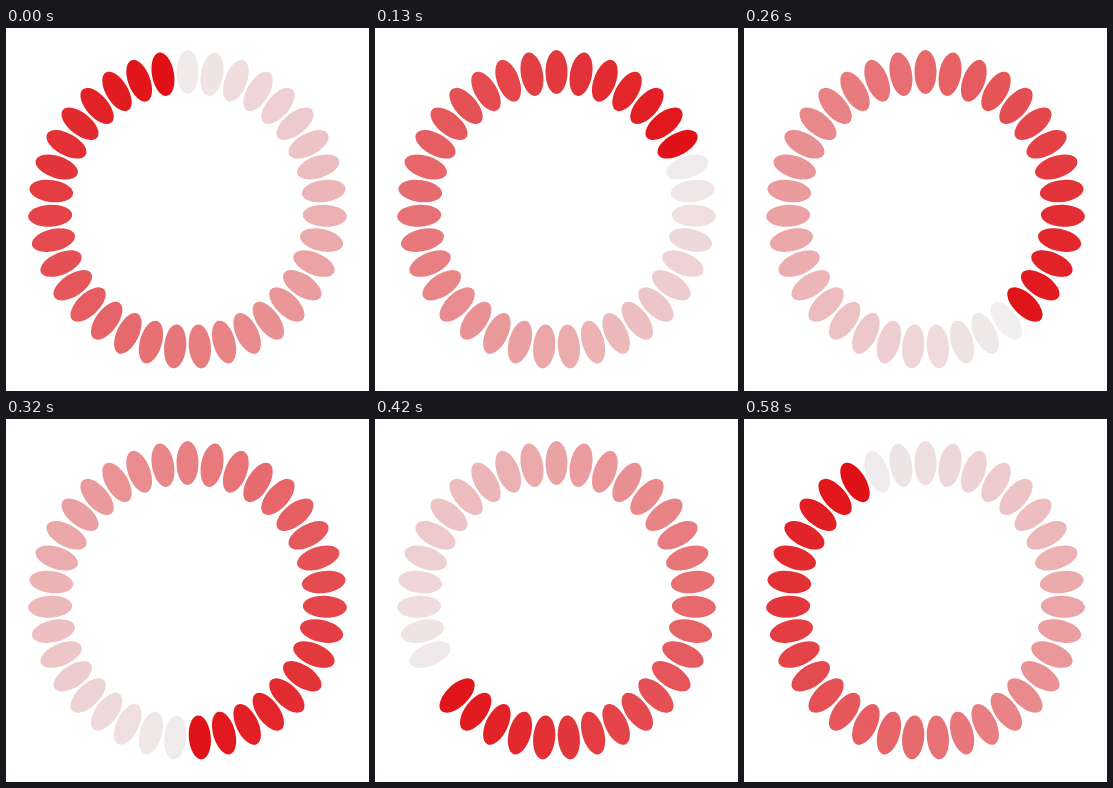
Write an HTML page with a canvas that moves like this. It is 363 px wide and 363 px high and loops after 620 ms.

```html
<!DOCTYPE html>
<html lang="en">
<head>
<meta charset="utf-8">
<title>Loading ring</title>
<style>
  html, body { margin: 0; width: 100%; height: 100%; overflow: hidden; background: #fff; }
  canvas { display: block; }
</style>
</head>
<body>
<canvas id="stage" width="363" height="363"></canvas>
<script>
const ctx = document.getElementById('stage').getContext('2d');
const SIZE = 363, LOOP = 620, STEPS = 19, PETALS = 35, RING = 137.5;
const PALE = [240, 240, 241], RED = [224, 16, 21];

// Steps last 32.4 ms, with their starts rounded to 10 ms.
function stepAt(ms) {
  const tick = Math.floor((ms % LOOP) / 10) * 10;
  return Math.floor((tick + 5) / 32.4);
}

function petalColor(age) {
  if (age < 0.1) return '#fff'; // blank for an instant before turning red
  const mix = PALE.map((c, k) => Math.round(c + (RED[k] - c) * age / PETALS));
  return `rgb(${mix})`;
}

function draw(ms) {
  const shift = stepAt(ms) * PETALS / STEPS;
  ctx.fillStyle = '#fff';
  ctx.fillRect(0, 0, SIZE, SIZE);
  for (let i = 0; i < PETALS; i++) {
    let age = i + 1 - shift;
    if (age <= 0) age += PETALS;
    ctx.save();
    ctx.translate(SIZE / 2, SIZE / 2);
    ctx.rotate(i * 2 * Math.PI / PETALS);
    ctx.beginPath();
    ctx.ellipse(0, -RING, 11, 22, 0, 0, 2 * Math.PI);
    ctx.fillStyle = petalColor(age);
    ctx.fill();
    ctx.restore();
  }
}

const start = performance.now();
function tick() {
  draw(performance.now() - start);
  requestAnimationFrame(tick);
}
tick();
</script>
</body>
</html>
```
